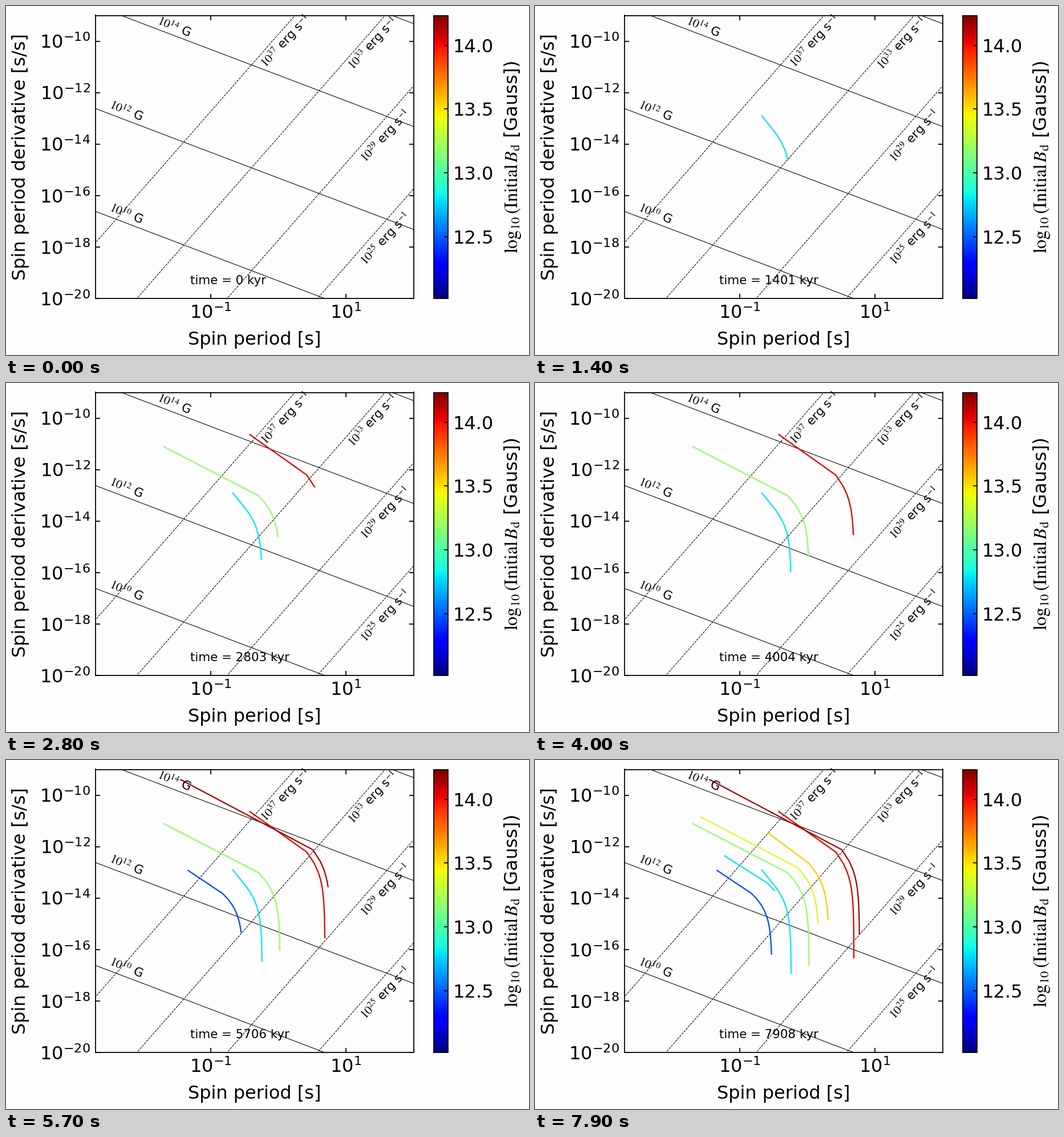
Write a matplotlib script that moves like this. It is 917 px wide and 611 px high and loops after 8000 ms.

```python
import numpy as np
import matplotlib.pyplot as plt
from matplotlib.animation import FuncAnimation
from matplotlib.cm import ScalarMappable
from matplotlib.colors import Normalize

W, H, DPI = 917, 611, 128
FRAMES, STEP_MS, KYR_PER_FRAME = 80, 100, 100.1
TOP, BOTTOM = 16.5, 511.8
BIG, SMALL = 18, 12
BG = "#fdfdfd"
FIELD_LINE = -39.32    # log(P Pdot) - 2 log B
POWER_LINE = -46.74    # log(Pdot / P^3) - log E

plt.rcParams.update({
    "font.family": "DejaVu Sans",
    "mathtext.fontset": "stix",
    "font.size": BIG,
    "axes.linewidth": 1.0,
    "xtick.major.pad": 5.2,
    "ytick.major.pad": 5.2,
})

# birth frame, log initial field, log initial period
PULSARS = [
    (6, 12.79, -0.67), (17, 13.18, -1.69), (26, 14.05, -0.42), (41, 12.45, -1.33),
    (51, 14.16, -1.44), (62, 13.37, -1.57), (63, 13.56, -0.585), (77, 12.79, -1.22),
]


def evolve(log_b, log_p0):
    """Period and its derivative, one sample per frame since birth."""
    n = np.arange(FRAMES)
    d = log_b - 12.5
    start = 2 * log_b + FIELD_LINE + 0.16
    # decay = B0 / B: strong fields fade faster
    decay = 1.3 + 0.27 * 10 ** (0.36 * d) * n + 0.0042 * 10 ** (0.69 * d) * n**2
    decay[0] = 1
    # the period saturates as the field fades
    g = ((decay - 1) / (1.35 + 0.75 * d)) ** 1.4
    gain = 10 ** (start + 13.18 - 0.48 * d)
    p = np.sqrt(10 ** (2 * log_p0) + gain * g / (1 + g))
    return p, 10**start / decay**2 / p


def box(left, right):
    return [left / W, 1 - BOTTOM / H, (right - left) / W, (BOTTOM - TOP) / H]


fig = plt.figure(figsize=(W / DPI, H / DPI), dpi=DPI, facecolor=BG)
ax = fig.add_axes(box(157, 714.7), facecolor=BG)
cax = fig.add_axes(box(749.6, 774.6))

ax.set(xscale="log", yscale="log", xlim=(0.002, 100), ylim=(1e-20, 1e-9))
ax.set_xticks([0.1, 10])
ax.set_yticks([10.0**e for e in range(-20, -9, 2)])
ax.minorticks_off()
ax.tick_params(direction="in", top=True, right=True, length=4.5, width=1.0)

# constant field and constant spin-down power
P = np.array([1e-3, 1e3])
for b in (10, 12, 14, 16):
    ax.plot(P, 10 ** (2 * b + FIELD_LINE) / P, "k-", lw=0.6)
for e in (25, 29, 33, 37):
    ax.plot(P, 10 ** (e + POWER_LINE) * P**3, "k--", lw=0.6)


def line_label(text, log_p, log_pdot, angle):
    ax.text(10**log_p, 10**log_pdot, text, fontsize=SMALL, rotation=angle,
            rotation_mode="anchor", ha="left", va="baseline")


for b, x, y in ((14, -1.80, -9.32), (12, -2.505, -12.58), (10, -2.505, -16.58)):
    line_label(rf"$10^{{{b}}}$ G", x, y, -23)
for e, x, y in ((37, 0.82, -11.06), (33, 2.11, -11.15), (29, 2.29, -14.73), (25, 2.29, -18.73)):
    line_label(rf"$10^{{{e}}}$ erg s$^{{-1}}$", x - 1, y, 47)

ax.text(0.5, -0.163, "Spin period [s]", transform=ax.transAxes,
        ha="center", va="baseline")
upright = dict(rotation=90, rotation_mode="anchor", ha="center", va="baseline")
ax.text(-0.22, 0.5, "Spin period derivative [s/s]",
        transform=ax.transAxes, **upright)

norm = Normalize(12.017, 14.233)
cmap = plt.get_cmap("jet")
bar = fig.colorbar(ScalarMappable(norm, cmap), cax=cax,
                   ticks=np.arange(12.5, 14.1, 0.5), format="%.1f")
bar.outline.set_linewidth(1.0)
cax.tick_params(direction="in", length=4, width=1.0)
cax.text(5.9, 0.5, r"$\log_{10}({\rm Initial}\,B_{\rm d}$ [Gauss])",
         transform=cax.transAxes, **upright)

clock = ax.text(0.2985, 0.05, "", transform=ax.transAxes,
                fontsize=SMALL, va="baseline")

trails = []
for birth, log_b, log_p0 in PULSARS:
    line, = ax.plot([], [], color=cmap(norm(log_b)), lw=1.25)
    trails.append((line, birth, *evolve(log_b, log_p0)))


def update(i):
    clock.set_text(f"time = {i * KYR_PER_FRAME:.0f} kyr")
    for line, birth, p, pdot in trails:
        n = max(i - birth + 1, 0)
        line.set_data(p[:n], pdot[:n])
    return [clock] + [t[0] for t in trails]


anim = FuncAnimation(fig, update, frames=FRAMES, interval=STEP_MS,
                     repeat=True, repeat_delay=0, blit=False)
plt.show()
```
